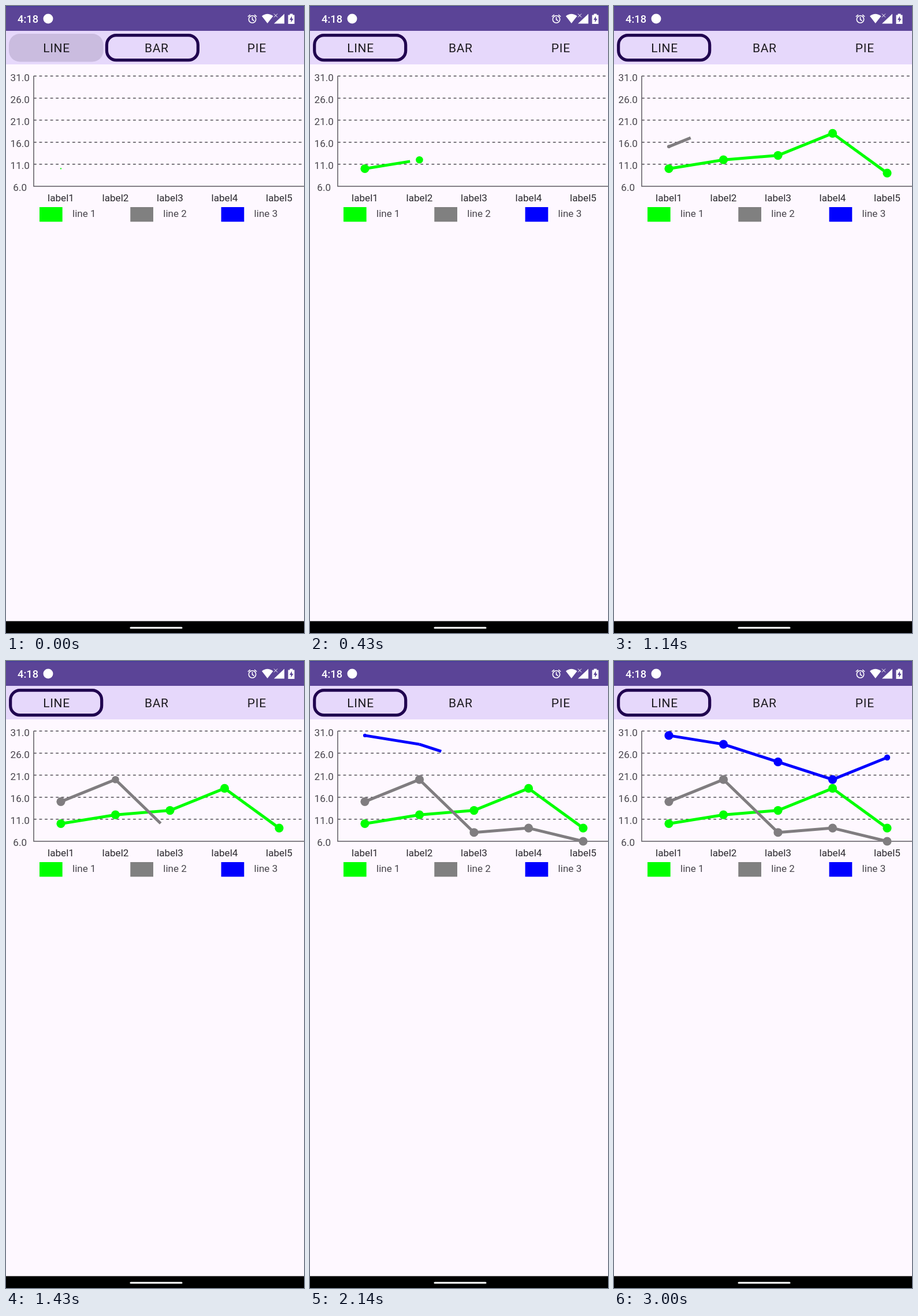
An HTML page that plays this animation: 516 px wide and 1085 px high, repeating every 3.14 s.

```html
<!DOCTYPE html>
<html lang="en">
<head>
<meta charset="utf-8">
<title>Line chart</title>
<style>
  html, body { margin: 0; width: 100%; height: 100%; overflow: hidden; background: #fef8ff; }
  svg { display: block; width: 516px; height: 1085px; font-family: Roboto, sans-serif; }
  .tabs { font-size: 21px; letter-spacing: .66px; fill: #1d1b20; text-anchor: middle; }
  .labels { font-size: 17.1px; fill: #2b292e; text-anchor: middle; }
  .values { fill: #48454c; }
  .legend { fill: #48454c; text-anchor: start; }
  .axis { stroke: #5c5960; stroke-width: 1.5; fill: none; }
  .grid { stroke: #514e55; stroke-width: 1.5; stroke-dasharray: 4.78; }
</style>
</head>
<body>
<svg id="stage" viewBox="0 0 516 1085">
  <rect width="516" height="1085" fill="#fef8ff"/>
  <rect width="516" height="43" fill="#5b4497"/>
  <rect width="516" height="1.5" fill="#453b9c"/>
  <text x="20" y="28.7" font-size="18.3" font-weight="500" fill="#fff">4:18</text>
  <circle cx="73" cy="22" r="8.5" fill="#fff"/>
  <g fill="none" stroke="#fff" stroke-width="1.6">
    <circle cx="426.5" cy="23" r="6.2"/>
    <path d="M426.5 19v4.5l3 2M418.8 18.5l4-3.4M434.2 18.5l-4-3.4"/>
    <path d="M464 13.5l6 6m0-6l-6 6" stroke-width="1"/>
  </g>
  <g fill="#fff">
    <path d="M443 17.5Q452.5 10 462.5 17.5L452.7 30z"/>
    <path d="M464 30.5L482 13.5V30.5z"/>
    <path d="M491.5 15.5v-2h5v2h3v15.500h-11V15.500z"/>
  </g>
  <path d="M495 17.500l-4 6.500h2.500v4.500l4-6.500h-2.500z" fill="#5b4497"/>

  <rect y="43" width="516" height="58" fill="#e6d8fb"/>
  <rect id="ripple" x="5" y="48" width="163.500" height="48.500" rx="19" fill="#cabcdf"/>
  <g class="tabs">
    <text x="87.500" y="80.300">LINE</text>
    <text x="260.800" y="80.300">BAR</text>
    <text x="434.300" y="80.300">PIE</text>
  </g>
  <rect id="ring" x="7.700" y="50.700" width="158" height="43" rx="16.500" fill="none" stroke="#20034f" stroke-width="5.200"/>

  <g id="chart"></g>

  <rect y="1064.500" width="516" height="20.500" fill="#000"/>
  <rect x="214.500" y="1074.500" width="91" height="3" rx="1.500" fill="#fff"/>
</svg>
<script>
const LOOP = 3140, FPS = 7, STEP = 200, RADIUS = 7.6, TAB_WIDTH = 173.5;
const series = [
  { color: '#00ff00', values: [10, 12, 13, 18, 9] },
  { color: '#807d80', swatch: '#808080', values: [15, 20, 8, 9, 6] },
  { color: '#0000ff', values: [30, 28, 24, 20, 25] },
];
const chart = document.getElementById('chart');
const ring = document.getElementById('ring');
const ripple = document.getElementById('ripple');
const pointX = i => 95 + 94.5 * i;
const valueY = v => 312 - (v - 6) * 7.63;
const clamp = v => Math.min(1, Math.max(0, v));

function add(tag, attrs, text) {
  const node = document.createElementNS('http://www.w3.org/2000/svg', tag);
  for (const key in attrs) node.setAttribute(key, attrs[key]);
  if (text) node.textContent = text;
  return chart.appendChild(node);
}

for (let v = 6; v <= 31; v += 5) {
  const y = valueY(v);
  if (v > 6) add('line', { class: 'grid', x1: 48, x2: 516, y1: y, y2: y });
  add('text', { class: 'labels values', x: 24.2, y: y + 8.3 }, v.toFixed(1));
}
add('path', { class: 'axis', d: 'M48 121V312H516' });
for (let i = 0; i < 5; i++) {
  add('text', { class: 'labels', x: pointX(i), y: 338.3 }, 'label' + (i + 1));
}

// Dots and segments run on separate queues, one item per step.
const dots = [], segments = [];
series.forEach(({ color, swatch, values }, s) => {
  const left = 58 + 157.3 * s;
  add('rect', { x: left, y: 348, width: 39.7, height: 25.3, fill: swatch || color });
  add('text', { class: 'labels legend', x: left + 57, y: 365 }, 'line ' + (s + 1));
  const points = values.map((v, i) => [pointX(i), valueY(v)]);
  points.slice(1).forEach((to, i) => {
    const from = points[i];
    const node = add('line', { x1: from[0], y1: from[1], stroke: color, 'stroke-width': 5 });
    segments.push({ node, from, to });
  });
  points.forEach(([cx, cy]) => dots.push(add('circle', { cx, cy, fill: color })));
});

// cubic-bezier(.4, 0, .2, 1), solved by bisection
function fastOutSlowIn(x) {
  let lo = 0, hi = 1, s = 0.5;
  for (let i = 0; i < 20; i++) {
    s = (lo + hi) / 2;
    const at = 1.2 * s * (1 - s) ** 2 + 0.6 * s * s * (1 - s) + s ** 3;
    if (at < x) lo = s; else hi = s;
  }
  return s * s * (3 - 2 * s);
}

function tickAt(t) {
  const n = Math.round(t * FPS / 1000);
  return Math.round(100 * n / FPS) * 10 > t ? n - 1 : n;
}

function draw(t) {
  const n = tickAt(t);
  // The first ticks run slow while the chart is being set up.
  const time = n < 2 ? 30 + 55 * n : n * 1000 / FPS - 63;
  const slide = TAB_WIDTH * (1 - fastOutSlowIn(clamp(time / 250)));
  ring.setAttribute('transform', `translate(${slide})`);
  ripple.setAttribute('opacity', 1 - clamp((time - 75) / 160));
  dots.forEach((dot, i) => dot.setAttribute('r', RADIUS * clamp(time / STEP - i)));
  segments.forEach(({ node, from, to }, i) => {
    const p = clamp(time / STEP - i - 1);
    node.setAttribute('x2', from[0] + (to[0] - from[0]) * p);
    node.setAttribute('y2', from[1] + (to[1] - from[1]) * p);
    node.setAttribute('visibility', p ? 'visible' : 'hidden');
  });
}

const start = performance.now();
function loop() {
  draw((performance.now() - start) % LOOP);
  requestAnimationFrame(loop);
}
loop();
</script>
</body>
</html>
```
